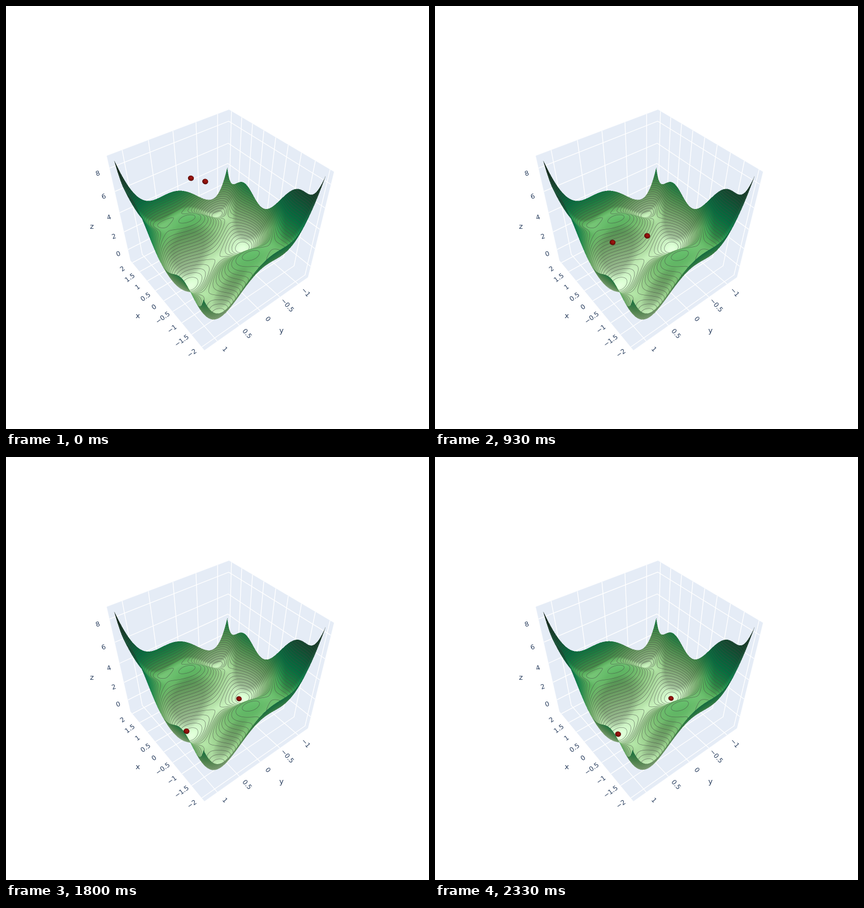
Animation of 748 by 748 pixels, one loop 2390 ms. Source, as an HTML page with a canvas:

```html
<!DOCTYPE html>
<html lang="en">
<head>
<meta charset="utf-8">
<title>Two balls on a surface</title>
<style>
html, body { margin: 0; width: 100%; height: 100%; overflow: hidden; background: #fff; }
canvas { display: block; }
</style>
</head>
<body>
<canvas id="stage" width="748" height="748"></canvas>
<script>
const SIZE = 748, LOOP = 2390, FRAME = 1000 / 15;
const ctx = document.getElementById('stage').getContext('2d');

// Camera: looks at the centre of a unit cube holding the plot.
const EYE = [-1.6, 1.25, 1.9];
const FOCAL = 697, CX = 373.9, CY = 383;
const dist = Math.hypot(...EYE), flat = Math.hypot(EYE[0], EYE[1]);
const cosA = -EYE[0] / flat, sinA = EYE[1] / flat;
const cosE = flat / dist, sinE = EYE[2] / dist;
const LIGHT = [cosA * sinE, -sinA * sinE, cosE];

function project(x, y, z) {
  const right = -sinA * x - cosA * y;
  const ahead = cosA * x - sinA * y;
  const up = ahead * sinE + z * cosE;
  const depth = dist + ahead * cosE - z * sinE;
  return { x: CX + FOCAL * right / depth, y: CY - FOCAL * up / depth, right, up, depth };
}

// Data space
const X_MAX = 2, Y_MAX = 1.2, X_SPAN = 4.25, Y_SPAN = 2.55;
const height = (x, y) => (4 - 2.1 * x * x + x ** 4 / 3) * x * x + x * y + (4 * y * y - 4) * y * y;
const slopeX = (x, y) => 8 * x - 8.4 * x ** 3 + 2 * x ** 5 + y;
const slopeY = (x, y) => x - 8 * y + 16 * y ** 3;
const Z_MIN = -1.0316, Z_MAX = height(X_MAX, Y_MAX);

function zScale(bottom) {
  const pad = (Z_MAX - bottom) / 32;
  const low = bottom - pad, span = Z_MAX + pad - low;
  return { span, at: z => (z - low) / span - 0.5 };
}

// Colours
const STOPS = [
  [214, 249, 207], [186, 228, 174], [156, 209, 143], [124, 191, 115], [85, 174, 91], [37, 157, 81],
  [7, 138, 78], [13, 117, 71], [23, 95, 61], [25, 75, 49], [23, 55, 35], [17, 36, 20]
];
const PALETTE = Array.from({ length: 512 }, (_, i) => {
  const p = i / 511 * (STOPS.length - 1), k = Math.min(STOPS.length - 2, Math.floor(p));
  return STOPS[k].map((c, j) => c + (STOPS[k + 1][j] - c) * (p - k));
});
const LINE_GREY = 68, LINE_ALPHA = 0.65, CONTOUR_STEP = (Z_MAX - Z_MIN) / 48;

const clamp = (v, a, b) => Math.max(a, Math.min(b, v));
const dot = (a, b) => a[0] * b[0] + a[1] * b[1] + a[2] * b[2];
const unit = v => { const n = Math.hypot(...v); return v.map(c => c / n); };

function highlight(normal, p) {
  const view = unit([EYE[0] - p.right, EYE[1] - p.up, EYE[2] + p.depth]);
  const half = unit(view.map((c, i) => c + LIGHT[i]));
  const c2 = Math.max(dot(normal, half), 1e-4) ** 2;
  return 255 * 0.05 * Math.exp((c2 - 1) / c2 / 0.25) / (Math.PI * 0.25 * c2 * c2);
}

// Strength of the contour line at height z; steep is the change of z per pixel.
function contourInk(z, steep) {
  const level = Math.max(1, Math.round((z - Z_MIN) / CONTOUR_STEP));
  const gap = Math.abs(z - Z_MIN - level * CONTOUR_STEP) / steep;
  const crowding = Math.min(1, CONTOUR_STEP / steep / 5);
  return LINE_ALPHA * crowding * clamp(1.2 - gap, 0, 1);
}

// Surface rasteriser, drawn at double resolution into a cropped area
const CROP = { x: 170, y: 260, w: 412, h: 312 }, ZOOM = 2, CELLS = 180;

function surfaceVertices(scale) {
  const list = [];
  for (let j = 0; j <= CELLS; j++) {
    for (let i = 0; i <= CELLS; i++) {
      const x = X_MAX * (2 * i / CELLS - 1), y = Y_MAX * (2 * j / CELLS - 1), z = height(x, y);
      const p = project(x / X_SPAN, y / Y_SPAN, scale.at(z));
      const normal = unit([-slopeX(x, y) * X_SPAN / scale.span, -slopeY(x, y) * Y_SPAN / scale.span, 1]);
      list.push({
        x: (p.x - CROP.x) * ZOOM, y: (p.y - CROP.y) * ZOOM, depth: p.depth, z,
        lit: dot(normal, LIGHT), shine: highlight(normal, p)
      });
    }
  }
  return list;
}

function renderSurface(scale) {
  const w = CROP.w * ZOOM, h = CROP.h * ZOOM;
  const canvas = new OffscreenCanvas(w, h), c = canvas.getContext('2d');
  const image = c.createImageData(w, h), px = image.data;
  const depths = new Float32Array(w * h).fill(1e9);
  const verts = surfaceVertices(scale);

  function triangle(a, b, d) {
    const bx = b.x - a.x, by = b.y - a.y, dx = d.x - a.x, dy = d.y - a.y;
    const area = bx * dy - by * dx;
    if (Math.abs(area) < 1e-9) return;
    const side = area < 0 ? 1 : -1;
    const zb = b.z - a.z, zd = d.z - a.z;
    const steep = Math.hypot(zb * dy - zd * by, zd * bx - zb * dx) / Math.abs(area) + 1e-9;
    const x0 = Math.max(0, Math.ceil(Math.min(a.x, b.x, d.x) - 0.5));
    const x1 = Math.min(w - 1, Math.floor(Math.max(a.x, b.x, d.x) - 0.5));
    const y0 = Math.max(0, Math.ceil(Math.min(a.y, b.y, d.y) - 0.5));
    const y1 = Math.min(h - 1, Math.floor(Math.max(a.y, b.y, d.y) - 0.5));
    for (let y = y0; y <= y1; y++) {
      for (let x = x0; x <= x1; x++) {
        const qx = x + 0.5 - a.x, qy = y + 0.5 - a.y;
        const u = (qx * dy - qy * dx) / area, v = (bx * qy - by * qx) / area;
        if (u < -1e-6 || v < -1e-6 || u + v > 1 + 1e-6) continue;
        const mix = key => a[key] + u * (b[key] - a[key]) + v * (d[key] - a[key]);
        const depth = mix('depth'), n = y * w + x;
        if (depth >= depths[n]) continue;
        depths[n] = depth;
        const z = mix('z');
        const color = PALETTE[Math.round(clamp((z - Z_MIN) / (Z_MAX - Z_MIN), 0, 1) * 511)];
        const light = Math.min(1, 0.8 + 0.8 * Math.max(0, side * mix('lit')));
        const shine = side > 0 ? mix('shine') : 0;
        const ink = contourInk(z, steep);
        for (let k = 0; k < 3; k++) {
          const base = Math.min(255, color[k] * light + shine);
          px[4 * n + k] = base + (LINE_GREY - base) * ink;
        }
        px[4 * n + 3] = 255;
      }
    }
  }

  for (let j = 0; j < CELLS; j++) {
    for (let i = 0; i < CELLS; i++) {
      const n = j * (CELLS + 1) + i, m = n + CELLS + 1;
      triangle(verts[n], verts[n + 1], verts[m]);
      triangle(verts[n + 1], verts[m + 1], verts[m]);
    }
  }
  c.putImageData(image, 0, 0);
  return canvas;
}

// Walls, grid and labels
const ticks = (from, to, step) =>
  Array.from({ length: Math.round((to - from) / step) + 1 }, (_, i) => from + i * step);
const X_TICKS = ticks(-2, 2, 0.5), Y_TICKS = ticks(-1, 1, 0.5), Z_TICKS = ticks(0, 8, 2);
const E = 0.5;

function trace(c, points) {
  c.beginPath();
  for (const p of points) {
    const q = project(...p);
    c.lineTo(q.x, q.y);
  }
}

function drawWalls(c, scale) {
  c.fillStyle = c.strokeStyle = '#e5ecf6';
  c.lineWidth = 0.5;
  const walls = [
    [[E, E, -E], [E, -E, -E], [E, -E, E], [E, E, E]],
    [[E, -E, -E], [-E, -E, -E], [-E, -E, E], [E, -E, E]],
    [[E, E, -E], [E, -E, -E], [-E, -E, -E], [-E, E, -E]]
  ];
  for (const wall of walls) {
    trace(c, wall);
    c.closePath();
    c.fill();
    c.stroke();
  }
  c.strokeStyle = '#fff';
  c.lineWidth = 1.3;
  const line = (...points) => { trace(c, points); c.stroke(); };
  for (const t of X_TICKS) line([t / X_SPAN, E, -E], [t / X_SPAN, -E, -E], [t / X_SPAN, -E, E]);
  for (const t of Y_TICKS) line([-E, t / Y_SPAN, -E], [E, t / Y_SPAN, -E], [E, t / Y_SPAN, E]);
  for (const t of Z_TICKS) line([E, E, scale.at(t)], [E, -E, scale.at(t)], [-E, -E, scale.at(t)]);
}

function label(c, text, x, y, degrees = 0, size = 11.5) {
  c.save();
  c.translate(x, y);
  c.rotate(degrees * Math.PI / 180);
  c.font = `${size}px "DejaVu Sans", sans-serif`;
  c.fillText(String(text).replace('-', '\u2212'), 0, 0);
  c.restore();
}

function drawLabels(c, scale) {
  c.fillStyle = '#2a3f5f';
  c.textAlign = 'center';
  c.textBaseline = 'middle';
  for (const t of X_TICKS) {
    const p = project(t / X_SPAN, E, -E);
    label(c, t, p.x - 17, p.y + 11.5, -36);
  }
  for (const t of Y_TICKS) {
    const p = project(-E, t / Y_SPAN, -E);
    label(c, t, p.x + 13, p.y + 15, 49);
  }
  for (const t of Z_TICKS) {
    const p = project(E, E, scale.at(t));
    label(c, t, p.x - 53 / p.depth, p.y + 26 / p.depth, -18);
  }
  label(c, 'x', 233, 549, 0, 13);
  label(c, 'y', 487, 575, 0, 13);
  label(c, 'z', 152, 391, 0, 13);
}

const plots = new Map();
function plotFor(bottom) {
  const key = bottom.toFixed(3);
  if (!plots.has(key)) {
    const canvas = new OffscreenCanvas(SIZE, SIZE), c = canvas.getContext('2d');
    const scale = zScale(bottom);
    c.fillStyle = '#fff';
    c.fillRect(0, 0, SIZE, SIZE);
    drawWalls(c, scale);
    c.imageSmoothingQuality = 'high';
    c.drawImage(renderSurface(scale), CROP.x, CROP.y, CROP.w, CROP.h);
    drawLabels(c, scale);
    plots.set(key, canvas);
  }
  return plots.get(key);
}

// Ball paths: step, x, y
const LEFT_PATH = [
  [0, 327, 304.5], [6, 326, 378], [8, 325, 384], [9, 323.2, 387], [13, 315.5, 411], [16, 311, 432],
  [18, 309.6, 446], [21, 312, 464], [24, 315.8, 478.3], [27, 319.2, 484.8], [31, 322, 488.5], [35, 323.7, 490]
];
const RIGHT_PATH = [
  [0, 352.3, 310.3], [6, 356, 380], [8, 360, 386.5], [9, 361.8, 388.8], [13, 372, 403], [16, 381.7, 413],
  [18, 388.5, 418], [21, 398, 424.5], [24, 406.4, 427.2], [27, 412, 427.5], [31, 416, 427], [35, 417.3, 426.8]
];

function along(path, step) {
  const k = Math.max(1, path.findIndex(p => p[0] >= step));
  const [s0, x0, y0] = path[k - 1], [s1, x1, y1] = path[k];
  const f = (step - s0) / (s1 - s0);
  return [x0 + (x1 - x0) * f, y0 + (y1 - y0) * f];
}

function drawBall([x, y], rx, ry) {
  ctx.save();
  ctx.translate(x, y);
  ctx.rotate(0.3);
  ctx.scale(rx, ry);
  const shade = ctx.createRadialGradient(0.15, -0.3, 0.1, 0, 0, 1);
  shade.addColorStop(0, '#a0160f');
  shade.addColorStop(0.6, '#860f0a');
  shade.addColorStop(1, '#4f0805');
  ctx.fillStyle = shade;
  ctx.beginPath();
  ctx.arc(0, 0, 1, 0, 2 * Math.PI);
  ctx.fill();
  ctx.restore();
}

function draw() {
  const time = performance.now() % LOOP;
  const step = Math.min(35, Math.floor((time + 3.4) / FRAME));
  const left = along(LEFT_PATH, step), right = along(RIGHT_PATH, step);
  // The z axis grows once the right ball dips below the surface minimum.
  const away = (417.5 - right[0]) / 15.6;
  const bottom = Math.min(Z_MIN, Z_MIN - 0.1 + 0.23 * away * away);
  ctx.drawImage(plotFor(bottom), 0, 0);
  const sunk = clamp((step - 18) / 12, 0, 1);
  drawBall(left, 5.3, 4.8);
  drawBall(right, 5.3 - 0.5 * sunk, 4.8 - 0.6 * sunk);
  requestAnimationFrame(draw);
}
draw();
</script>
</body>
</html>
```
